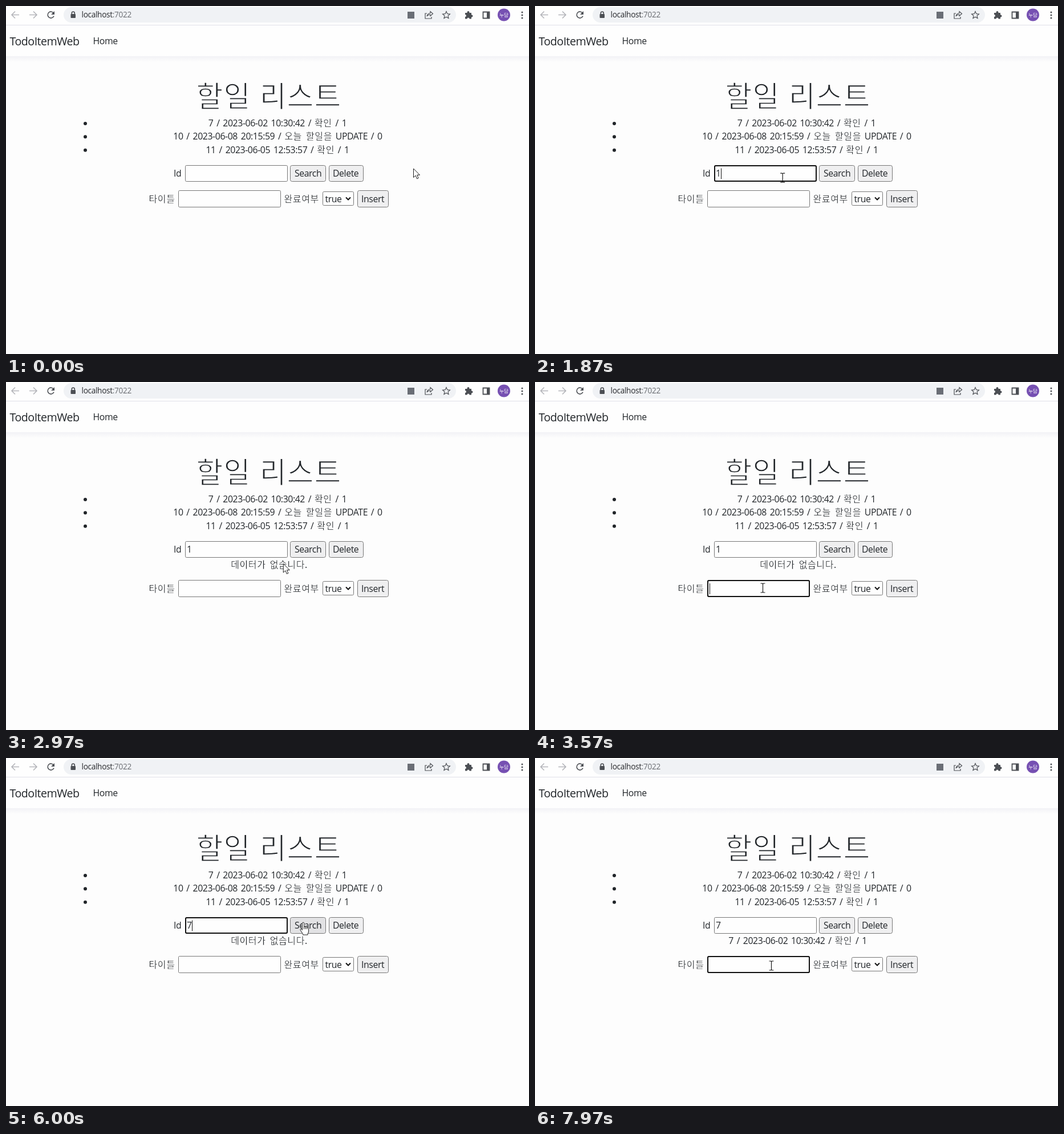
Write an HTML page that moves like this. It is 917 px wide and 610 px high and loops after 8000 ms.

```html
<!DOCTYPE html>
<html lang="ko">
<head>
<meta charset="utf-8">
<title>TodoItemWeb</title>
<style>
  html, body { margin: 0; width: 100%; height: 100%; overflow: hidden; background: #fdfdfd; }
  svg { display: block; }
  text { font: 15.8px 'Open Sans', 'Noto Sans CJK KR', sans-serif; letter-spacing: -.4px; fill: #212529; white-space: pre; }
  .ko { font: 16px 'Noto Sans CJK KR', sans-serif; letter-spacing: .6px; stroke: #fdfdfd; stroke-width: .3px; }
  .mid { text-anchor: middle; word-spacing: 2.1px; }
  .brand { font-size: 19.6px; letter-spacing: -.5px; }
  .url { font-size: 13.6px; letter-spacing: -.3px; fill: #26282c; }
  .url tspan { fill: #6a6d72; }
  .title { font: 300 51px 'Noto Sans CJK KR', sans-serif; letter-spacing: 1px; text-anchor: middle; stroke: #fdfdfd; stroke-width: 1.6px; }
  .avatar { font: 8.5px 'Noto Sans CJK KR', sans-serif; letter-spacing: 0; fill: #fff; text-anchor: middle; }
  .line { fill: none; stroke: #4c4f54; stroke-width: 1.6; }
  .off { stroke: #b4b5ba; }
  .solid { fill: #4c4f54; }
  .field { fill: #fefefe; stroke: #777; }
  .ring { fill: none; stroke: #101010; stroke-width: 2; }
  .button rect { fill: #efeff0; stroke: #777; }
  .button.hover rect { fill: #e2e2e4; }
  .caret { fill: #111; }
  #cursor path { fill: #fff; stroke: #1c1c1c; stroke-linejoin: round; }
  #cursor #beam { fill: none; stroke-width: 1.2; }
</style>
</head>
<body>
<svg width="917" height="610" viewBox="0 0 917 610">
  <defs>
    <linearGradient id="shade" x2="0" y2="1">
      <stop stop-color="#f2f2f6"/><stop offset="1" stop-color="#fdfdfd"/>
    </linearGradient>
  </defs>
  <rect width="917" height="610" fill="#fdfdfd"/>

  <!-- browser bar -->
  <rect width="917" height="33" fill="#fefefe"/>
  <rect y="33" width="917" height="1" fill="#dfe0e8"/>
  <rect x="101" y="2" width="688" height="27" rx="13.5" fill="#f0f2f5"/>
  <path class="line off" d="M23 15.5H10.5M16 9.5L10 15.5L16 21.5M41 15.5H53.5M48 9.5L54 15.5L48 21.5"/>
  <path class="line" d="M83.5 12.5A5.6 5.6 0 1 0 84 17.5"/>
  <path class="solid" d="M85 9V15H79Z"/>
  <rect class="solid" x="113.5" y="14" width="8.5" height="7" rx="1"/>
  <path class="line" d="M115.3 14V12.5a2.5 2.5 0 0 1 5 0V14"/>
  <text class="url" x="132.500" y="20">localhost<tspan>:7022</tspan></text>
  <rect x="704" y="10" width="12" height="12" fill="#6a6e76"/>
  <g class="line" style="stroke-width:1.2">
    <path d="M738 13H735V22H746V19M738 18Q739 13 744 12.5V9.5L748.5 13.5L744 17.5V15Q740 15 738 18Z"/>
    <path d="M772 9.5L773.9 13.7L778.4 14.1L775 17.1L776 21.5L772 19.2L768 21.5L769 17.1L765.6 14.1L770.1 13.7Z"/>
    <path style="stroke-width:1.8" d="M836.5 10.5H847.5V21.5H836.5Z"/>
  </g>
  <path class="solid" d="M805 12H808.5V11a2 2 0 0 1 4 0V12H816V15.5H816.5a2 2 0 0 1 0 4H816V22.5H812.5a2 2 0 0 0-4 0H805V19a2 2 0 0 0 0-4Z"/>
  <rect class="solid" x="843" y="10" width="5" height="12"/>
  <circle cx="873" cy="15.5" r="11" fill="#7650b2"/>
  <text class="avatar" x="873" y="18.7">누담</text>
  <g class="solid">
    <circle cx="905" cy="11" r="1.5"/><circle cx="905" cy="16" r="1.5"/><circle cx="905" cy="21" r="1.5"/>
  </g>

  <!-- page -->
  <rect y="34" width="917" height="54" fill="#fefefe"/>
  <rect y="88" width="917" height="10" fill="url(#shade)"/>
  <text class="brand" x="6.5" y="69">TodoItemWeb</text>
  <text x="152.5" y="67">Home</text>
  <text class="title" x="461" y="176.5">할일 리스트</text>
  <g fill="#212529">
    <circle cx="139" cy="206" r="3"/><circle cx="139" cy="229.3" r="3"/><circle cx="139" cy="252.7" r="3"/>
  </g>
  <text class="mid" x="476" y="210.5">7 / 2023-06-02 10:30:42 / <tspan class="ko">확인</tspan> / 1</text>
  <text class="mid" x="476.5" y="234">10 / 2023-06-08 20:15:59 / <tspan class="ko">오늘 할일을</tspan> UPDATE / 0</text>
  <text class="mid" x="476" y="257.5">11 / 2023-06-05 12:53:57 / <tspan class="ko">확인</tspan> / 1</text>

  <text x="294" y="299">Id</text>
  <rect class="field" x="314.5" y="279.5" width="179" height="28" rx="2"/>
  <rect class="ring" id="idRing" x="315" y="280" width="178" height="27" rx="2"/>
  <text id="idText" x="317" y="299"></text>
  <rect class="caret" id="idCaret" y="284.5" width="1" height="19"/>
  <g class="button" id="search">
    <rect x="498.5" y="279.5" width="62" height="28" rx="3"/><text x="506" y="299">Search</text>
  </g>
  <g class="button" id="delete">
    <rect x="566.5" y="279.5" width="60" height="28" rx="3"/><text x="573" y="299">Delete</text>
  </g>
  <text class="mid" id="missing" x="461" y="325.5"><tspan class="ko">데이터가 없습니다</tspan>.</text>
  <text class="mid" id="found" x="460.5" y="325.5">7 / 2023-06-02 10:30:42 / <tspan class="ko">확인</tspan> / 1</text>

  <g id="form">
    <text class="ko" x="250.5" y="343.5">타이틀</text>
    <rect class="field" x="302.5" y="323.5" width="179" height="29" rx="2"/>
    <rect class="ring" id="titleRing" x="303" y="324" width="178" height="28" rx="2"/>
    <rect class="caret" id="titleCaret" x="306" y="329" width="1" height="19"/>
    <text class="ko" x="487.5" y="343.5">완료여부</text>
    <rect class="field" x="555.5" y="325.5" width="54" height="24" rx="2"/>
    <text x="559.5" y="343.5">true</text>
    <path d="M596 335.5L600 339.5L604 335.5" fill="none" stroke="#111" stroke-width="2"/>
    <g class="button" id="insert">
      <rect x="616.5" y="323.5" width="54" height="29" rx="3"/><text x="623" y="343.5">Insert</text>
    </g>
  </g>

  <g id="cursor">
    <path id="arrow" d="M0 0V15.5L3.7 12.2L6 17.8L8.6 16.7L6.3 11.2H11Z"/>
    <path id="beam" d="M-4-8H-1L0-7L1-8H4M-4 8H-1L0 7L1 8H4M0-7V7"/>
    <path id="hand" d="M-1.6 1Q0-1 1.6 1V8Q3 6.8 4.3 8.4Q5.8 7.4 7 9Q8.6 8.4 9.6 10.2V16Q9.6 18 8 20V22H-.4V20.5L-5 13.5Q-5.2 11.4-3.2 12L-1.6 13.6ZM1.6 8V12M4.4 8.6V12M7 9.2V12"/>
  </g>
</svg>
<script>
  const LOOP = 8000, BLINK = 530, SHIFT = 24;
  const $ = id => document.getElementById(id);
  const show = (id, on) => { $(id).style.display = on ? '' : 'none'; };

  // time, focused field, id value, search result
  const states = [
    [0, '', '', ''],
    [570, 'id', '', ''],
    [1500, 'id', '1', ''],
    [2700, '', '1', 'missing'],
    [3370, 'title', '1', 'missing'],
    [5170, 'id', '1', 'missing'],
    [5750, 'id', '', 'missing'],
    [5850, 'id', '7', 'missing'],
    [6350, '', '7', 'found'],
    [6950, 'title', '7', 'found']
  ];

  // time, x, y of the pointer
  const path = [
    [0, 714.5, 285], [30, 714.5, 285], [550, 377.5, 303],
    [1650, 377.5, 303], [2180, 528, 298],
    [2750, 528, 298], [3330, 399.5, 361],
    [3950, 399.5, 361], [4350, 500, 357], [4650, 470, 350], [4940, 370.5, 299],
    [5720, 370.5, 299], [5960, 521, 288],
    [6530, 521, 288], [6900, 415, 362],
    [7380, 415, 362], [7640, 500, 340], [7940, 414.5, 364], [LOOP, 414.5, 364]
  ];

  function pointer(t) {
    const i = path.findIndex(p => p[0] > t);
    const [t0, x0, y0] = path[i - 1], [t1, x1, y1] = path[i];
    const u = (t - t0) / (t1 - t0), k = u * u * (3 - 2 * u);
    return [x0 + (x1 - x0) * k, y0 + (y1 - y0) * k];
  }

  function draw(t) {
    const [since, focus, value, result] = states.filter(s => s[0] <= t).pop();
    const shift = result ? SHIFT : 0;
    const lit = Math.floor((t - since) / BLINK) % 2 === 0;

    for (const name of ['id', 'title']) {
      show(name + 'Ring', focus === name);
      show(name + 'Caret', focus === name && lit);
    }
    $('idText').textContent = value;
    $('idCaret').setAttribute('x', value ? 326 : 318);
    show('missing', result === 'missing');
    show('found', result === 'found');
    $('form').setAttribute('transform', `translate(0 ${shift})`);

    const [x, y] = pointer(t);
    const over = (left, right, top) => x >= left && x <= right && y >= top && y <= top + 29;
    const hovered = {
      search: over(498, 561, 279),
      delete: over(566, 627, 279),
      insert: over(616, 671, 323.5 + shift)
    };
    for (const id in hovered) $(id).classList.toggle('hover', hovered[id]);
    const hand = Object.values(hovered).includes(true);
    const beam = over(314, 493, 279) || over(302, 482, 323.5 + shift);
    show('hand', hand);
    show('beam', beam);
    show('arrow', !hand && !beam);
    $('cursor').setAttribute('transform', `translate(${x} ${y})`);
  }

  const start = performance.now();
  function tick() {
    draw((performance.now() - start) % LOOP);
    requestAnimationFrame(tick);
  }
  tick();
</script>
</body>
</html>
```
